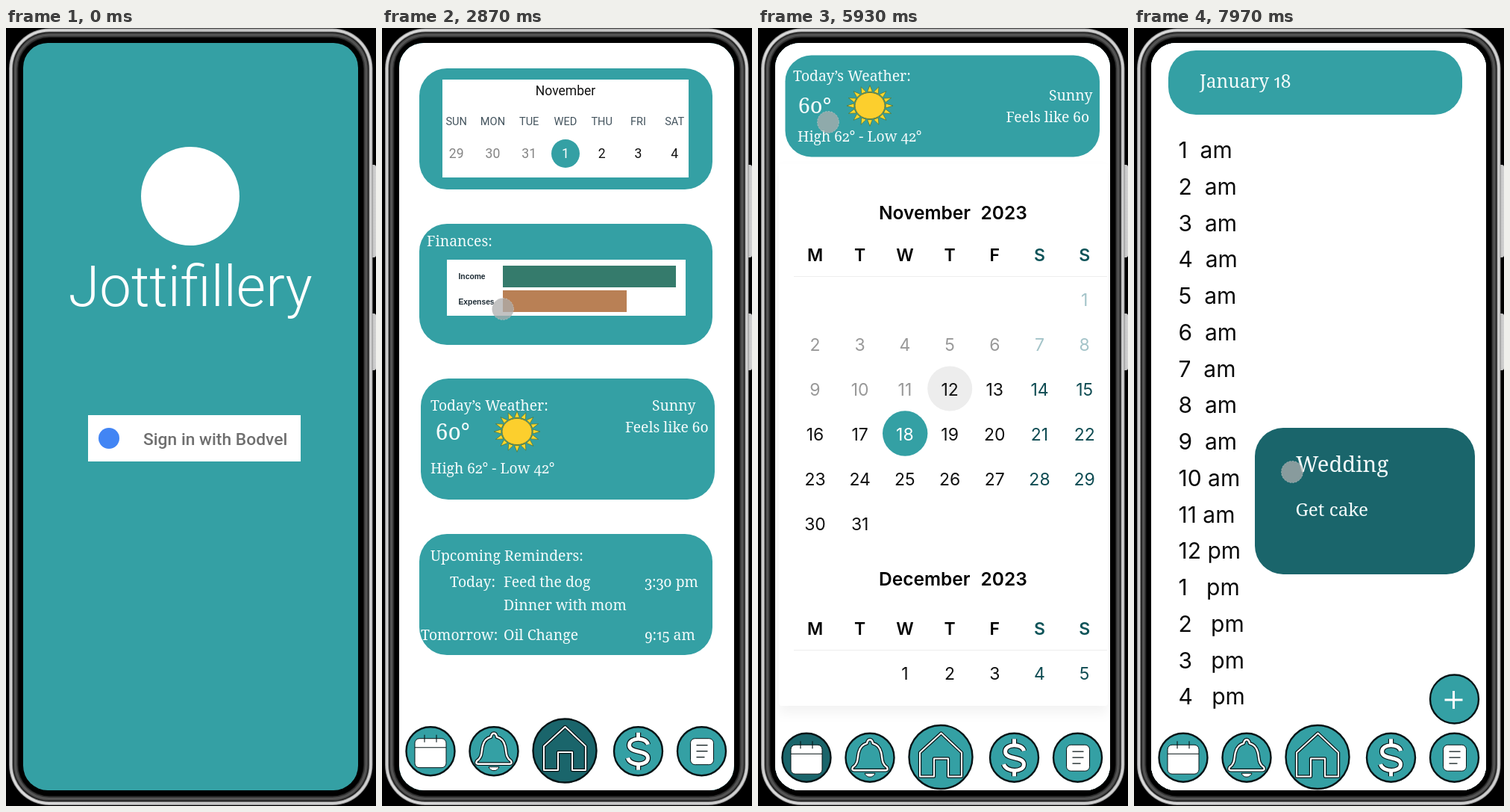
These frames come from a looping animation (496x1041 px, 8 s). An HTML page:

```html
<!DOCTYPE html>
<html lang="en">
<head>
<meta charset="utf-8">
<title>Planner app walkthrough</title>
<style>
  html, body { margin: 0; width: 100%; height: 100%; overflow: hidden; background: #000; }
  svg { display: block; width: 496px; height: 1041px; }
  text { white-space: pre; }
  .serif { font-family: "Noto Serif", serif; font-variant-numeric: oldstyle-nums proportional-nums; fill: #f4fbfb; }
  .roboto { font-family: Roboto, sans-serif; }
  .inter { font-family: Inter, sans-serif; }
  .arial { font-family: "Liberation Sans", sans-serif; font-weight: 700; }
  .mid { text-anchor: middle; }
  .semi { font-weight: 600; }
  .edge { fill: none; stroke: #071416; stroke-linejoin: round; }
  .line { fill: none; stroke: #fff; stroke-linejoin: round; }
</style>
</head>
<body>
<svg id="stage" viewBox="0 0 496 1041"></svg>
<script>
const TEAL = '#34a0a4', DARK = '#1a656b', INK = '#071416';
const LOOP = 8000;

const rect = (x, y, w, h, fill, r = 0) =>
  `<rect x="${x}" y="${y}" width="${w}" height="${h}" rx="${r}" fill="${fill}"/>`;
const circle = (x, y, r, fill, more = '') =>
  `<circle cx="${x}" cy="${y}" r="${r}" fill="${fill}" ${more}/>`;
const text = (x, y, size, cls, str, fill) =>
  `<text x="${x}" y="${y}" font-size="${size}" class="${cls}"${fill ? ` style="fill:${fill}"` : ''}>${str}</text>`;
const serif = (x, y, str, size = 19.4) => text(x, y, size, 'serif', str);
const at = (x, y, body) => `<g transform="translate(${x} ${y})">${body}</g>`;
const outlined = (d, w) =>
  `<path class="edge" d="${d}" stroke-width="${w + 2.4}"/><path class="line" d="${d}" stroke-width="${w}"/>`;
const finger = (x, y) =>
  circle(x, y, 14.5, '#adadad', 'fill-opacity=".75" stroke="#ddd" stroke-opacity=".6" stroke-width=".8" stroke-dasharray="2 2"');

function sun(x, y) {
  const point = (r, a) => `${(r * Math.cos(a)).toFixed(1)} ${(r * .88 * Math.sin(a)).toFixed(1)}`;
  let rays = '';
  for (let i = 0; i < 16; i++) {
    const a = i * Math.PI / 8;
    rays += `M${point(21.5, a - .16)}L${point(31, a)}L${point(21.5, a + .16)}Z`;
  }
  return at(x, y, `<path d="${rays}" fill="#fdd62b" stroke="#46703a" stroke-width=".7"/>
    <ellipse rx="20" ry="17.6" fill="#fccf2d" stroke="#6f7f35" stroke-width="1"/>`);
}

const icons = {
  calendar: `<rect x="-21" y="-17" width="42" height="39" rx="6" fill="#fff" stroke="${INK}"/>
    <path class="edge" d="M-21 -5H21M-8 -22V-12M8 -22V-12" stroke-width="1.1"/>`,
  bell: outlined('M-23 13C-15 8 -17 0 -15 -7C-13 -15 -8 -18 -4 -19Q-3 -24 0 -24Q3 -24 4 -19C8 -18 13 -15 15 -7C17 0 15 8 23 13Q25 17 21 17H-21Q-25 17 -23 13Z', 2.4) +
    `<path d="M-7 21H7Q5 26 0 26Q-5 26 -7 21Z" fill="#fff" stroke="${INK}"/>`,
  home: outlined('M0.500 -32L-28 -6V26H-9V2H10V26H28V-6Z', 2),
  dollar: outlined('M0 -25V-16M0 16V25M13 -9C11 -19 -12 -19 -12 -8C-12 3 13 -2 13 9C13 20 -11 20 -14 9', 5),
  notes: `<rect x="-15" y="-17" width="31" height="35" rx="6" fill="#fff" stroke="${INK}"/>
    <path class="edge" d="M-7 -8H8M-7 0H8M-7 8H4" stroke-width="1.2"/>`
};

function nav(dx, dy, active) {
  const spots = { calendar: 65, bell: 150, home: 245, dollar: 343.5, notes: 428.5 };
  return Object.keys(spots).map(name => {
    const big = name === 'home';
    return at(spots[name] + dx, (big ? 967 : 967.7) + dy,
      circle(0, 0, big ? 42.5 : 32.5, name === active ? DARK : TEAL, `stroke="${INK}" stroke-width="2.4"`) + icons[name]);
  }).join('');
}

function loginPage() {
  return rect(23, 20, 449, 1000, TEAL) +
    circle(247, 225, 66, '#fff') +
    `<g font-weight="300">${text(247, 372, 76, 'roboto mid', 'Jottifillery', '#fff')}</g>` +
    rect(110, 518, 285, 62, '#fff') +
    circle(138, 549, 14, '#4285f4') +
    `<g font-weight="500">${text(184, 558, 22.8, 'roboto', 'Sign in with Bodvel', '#6f6f6f')}</g>`;
}

function homePage() {
  const days = ['SUN', 'MON', 'TUE', 'WED', 'THU', 'FRI', 'SAT'];
  const week = days.map((name, i) => {
    const x = 99.7 + i * 48.75;
    const num = i < 3 ? 29 + i : i - 2;
    return text(x, 130, 14.6, 'roboto mid', name, '#44545e') +
      text(x, 174, 17.6, 'roboto mid', num, i < 3 ? '#858585' : i === 3 ? '#fff' : '#111');
  }).join('');
  return rect(23, 20, 449, 1000, '#fff') +
    rect(50, 54, 393, 162, TEAL, 37) + rect(81, 69, 330, 131, '#fff') +
    text(246, 90, 17.5, 'roboto mid', 'November', '#111') +
    circle(246, 168, 19, TEAL) + week +
    rect(50, 262, 393, 162, TEAL, 37) + serif(60, 292, 'Finances:') +
    rect(87, 310, 320, 75, '#fff') +
    text(102.5, 336, 10.3, 'arial', 'Income', '#1c2a33') +
    text(102.5, 370, 10.3, 'arial', 'Expenses', '#1c2a33') +
    rect(162, 318, 232, 29, '#357b6c') + rect(162, 351, 166, 29, '#b98055') +
    rect(52, 469, 394, 162, TEAL, 37) +
    serif(65, 512, 'Today’s Weather:') + serif(72, 551, '60°', 30) + sun(181, 540) +
    serif(362, 512, 'Sunny') + serif(326, 541, 'Feels like 60') +
    serif(65, 596, 'High 62° - Low 42°') +
    rect(50, 677, 393, 162, TEAL, 37) +
    serif(65, 713, 'Upcoming Reminders:') +
    serif(91, 748, 'Today:') + serif(163, 748, 'Feed the dog') + serif(352, 748, '3:30 pm') +
    serif(163, 779, 'Dinner with mom') +
    serif(52, 819, 'Tomorrow:') + serif(163, 819, 'Oil Change') + serif(352, 819, '9:15 am') +
    nav(0, 0, 'home');
}

function month(name, y, headY, first, last, dayColor) {
  const colX = c => 76.5 + c * 60.2;
  let out = text(162, y, 24.5, 'inter semi', name) + text(298.5, y, 24.5, 'inter semi', '2023') +
    rect(48, headY + 20, 420, 1, '#ededed');
  [...'MTWTFSS'].forEach((d, c) => {
    out += text(colX(c), headY, 23, 'inter semi mid', d, c > 4 ? '#0f5459' : '#000');
  });
  for (let d = 1; d <= last; d++) {
    const cell = first + d - 1, c = cell % 7;
    out += text(colX(c), headY + 60 + 60 * Math.floor(cell / 7), 23, 'inter mid', d, dayColor(d, c > 4));
  }
  return out;
}

function calendarPage() {
  const november = (d, weekend) =>
    d === 18 ? '#fff' : d < 12 ? (weekend ? '#a4c4c9' : '#999') : weekend ? '#0f4c53' : '#111';
  const december = (d, weekend) => weekend ? '#0f4c53' : '#111';
  return rect(23, 20, 449, 1000, '#fff') +
    `<g style="filter:drop-shadow(0 9px 8px #0000000d)">${rect(28, 182, 441, 725, '#fff', 4)}</g>` +
    rect(36.5, 36.5, 421.5, 136, TEAL, 35) +
    serif(47, 71, 'Today’s Weather:') + serif(54, 114, '60°', 29) + sun(150, 104) +
    serif(390, 97, 'Sunny') + serif(332.5, 126, 'Feels like 60') +
    serif(53, 152, 'High 62° - Low 42°') +
    circle(257.2, 482.5, 30, '#ededed') + circle(197.2, 542.5, 30.2, TEAL) +
    month('November', 256, 312, 6, 31, november) +
    month('December', 746, 812, 2, 5, december) +
    nav(0, 8.5, 'calendar');
}

function dayPage() {
  let hours = '';
  for (let i = 0; i < 16; i++) {
    const h = i % 12 + 1, pm = i > 10;
    const gap = ' '.repeat(h > 9 ? 1 : pm ? 3 : 2);
    hours += text(59.5, 174 + i * 48.75, 30, 'inter', h + gap + (pm ? 'pm' : 'am'), '#0a0a0a');
  }
  return rect(23, 20, 449, 1000, '#fff') +
    rect(46, 30, 394, 86, TEAL, 37) + serif(88, 80, 'January 18', 24.5) + hours +
    rect(162, 535, 295, 196, DARK, 38) +
    serif(217, 594, 'Wedding', 29.2) + serif(216.5, 653, 'Get cake', 24.3) +
    circle(429.5, 898, 32.5, TEAL, `stroke="${INK}" stroke-width="2.4"`) +
    '<path class="line" d="M416.500 899H440.500M428.500 887V911" stroke-width="3"/>' +
    nav(1, 8.5) + finger(212, 594);
}

// Nested shells: inset from the outer edge, fill
const shells = [
  [0, '#8c8c8c'], [1, 'url(#metal)'], [4, '#8a8a8a'], [5, '#1c1c1c'],
  [6.5, '#4a4a4a'], [8, '#565656'], [10, '#3a3a3a'], [11.5, '#1a1a1a'], [12.5, '#000']
];
const phone =
  rect(487, 183, 9, 124, 'url(#metal)', 3) + rect(487, 382, 9, 76, 'url(#metal)', 3) +
  shells.map(([d, fill]) => rect(4 + d, .5 + d, 487.5 - 2 * d, 1039.5 - 2 * d, fill, 54 - d)).join('');

const stage = document.getElementById('stage');
stage.innerHTML = `<defs>
    <linearGradient id="metal" x2="1" y2="0">
      <stop stop-color="#c4c4c4"/><stop offset=".01" stop-color="#dcdcdc"/>
      <stop offset=".5" stop-color="#c4c4c4"/><stop offset="1" stop-color="#d2d2d2"/>
    </linearGradient>
    <clipPath id="screen"><rect x="23" y="20" width="449" height="1000" rx="33"/></clipPath>
  </defs>${phone}<g clip-path="url(#screen)">` +
  [loginPage, homePage, calendarPage, dayPage].map(page => `<g class="page">${page()}</g>`).join('') +
  `</g><g id="finger">${finger(0, 0)}</g>`;

// Touch path: time, x, y
const path = [
  [480, 176, 1060], [700, 215, 985], [900, 275, 880], [1100, 328, 745], [1300, 345, 627],
  [1400, 341, 566], [1500, 318, 545], [1700, 272, 537],
  [2570, 272, 537], [2700, 225, 480], [2870, 162, 376], [3000, 147, 290], [3130, 185, 185],
  [3240, 265, 141], [3340, 360, 155], [3400, 390, 190], [3520, 380, 260], [3750, 228, 400],
  [3950, 270, 560], [4230, 375, 728], [4380, 345, 832], [4500, 230, 790], [4620, 182, 560],
  [4770, 267, 281], [4900, 292, 190], [5070, 300, 146],
  [5440, 300, 146], [5600, 235, 96], [5760, 140, 93], [5930, 94, 126], [6080, 92, 180],
  [6270, 150, 221], [6500, 270, 390], [6730, 376, 627], [6860, 330, 795], [6960, 240, 795],
  [7100, 168, 683], [7250, 157, 600], [7400, 171, 533]
];

const same = (a, b) => a[1] === b[1] && a[2] === b[2];

function slope(i, k) {
  const a = path[i - 1], p = path[i], b = path[i + 1];
  if (!a || !b || same(a, p) || same(p, b)) return 0;
  return (b[k] - a[k]) / (b[0] - a[0]);
}

function position(t) {
  const last = path.length - 1;
  if (t <= path[0][0]) return path[0].slice(1);
  if (t >= path[last][0]) return path[last].slice(1);
  const i = path.findIndex(p => p[0] > t) - 1;
  const a = path[i], b = path[i + 1], span = b[0] - a[0], u = (t - a[0]) / span;
  const ease = u * u * (3 - 2 * u);
  return [1, 2].map(k => a[k] + (b[k] - a[k]) * ease +
    span * u * (1 - u) * (slope(i, k) * (1 - u) - slope(i + 1, k) * u));
}

const fade = (t, from, to) => Math.min(1, Math.max(0, (t - from) / (to - from)));
const pages = stage.querySelectorAll('.page');
const touch = document.getElementById('finger');
let start;

function draw(now) {
  start ??= now;
  const t = (now - start) % LOOP;
  const last = fade(t, 7670, 7970);
  pages[1].style.opacity = fade(t, 1970, 2270);
  pages[2].style.opacity = fade(t, 5140, 5230);
  pages[3].style.opacity = last;
  touch.style.opacity = 1 - last;
  touch.setAttribute('transform', `translate(${position(t)})`);
  requestAnimationFrame(draw);
}
requestAnimationFrame(draw);
</script>
</body>
</html>
```
